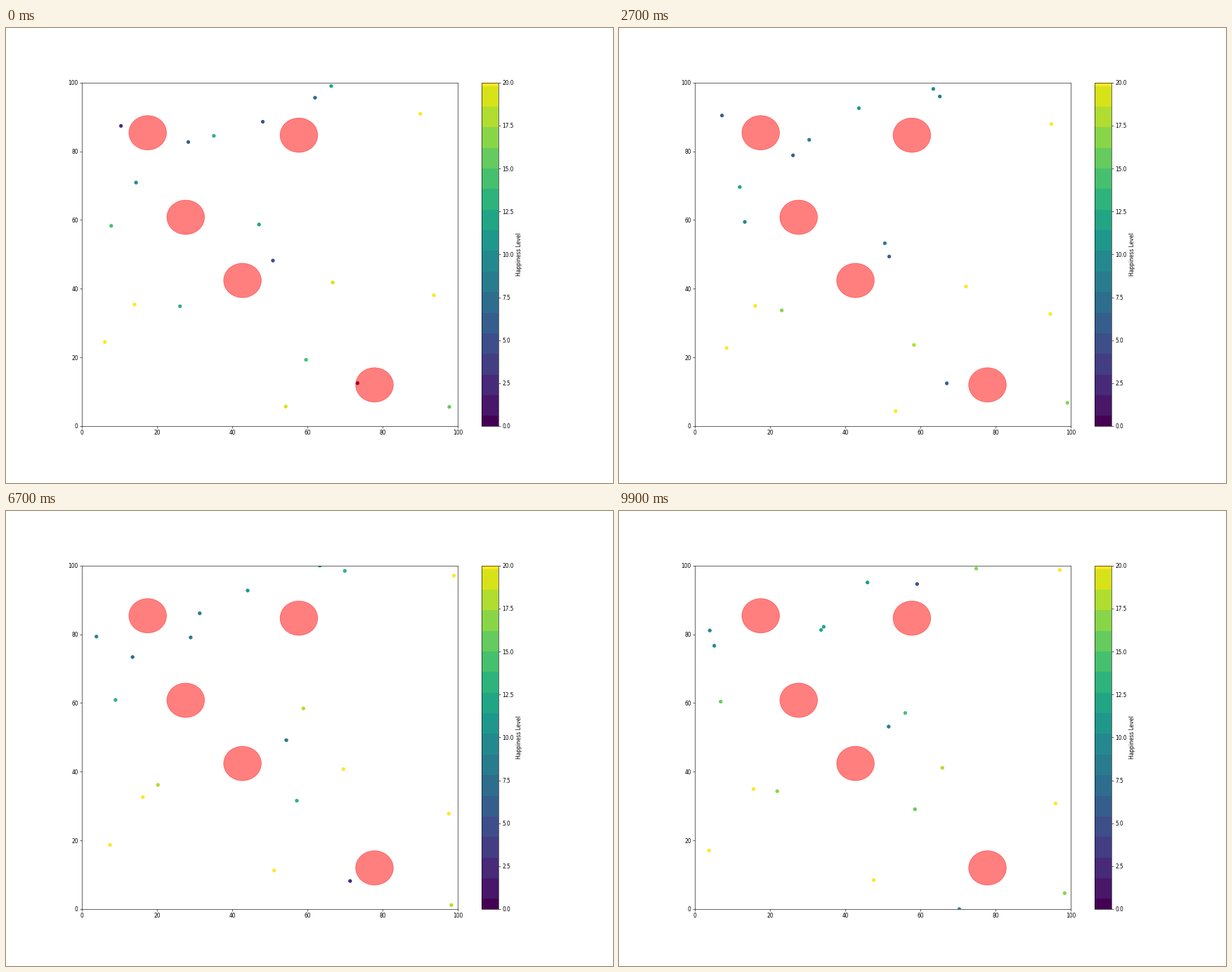
Recreate the animation shown at these times as a matplotlib script. Size 864 by 648 pixels, loop 10000 ms.

```python
import numpy as np
import matplotlib.pyplot as plt
from matplotlib.animation import FuncAnimation
from matplotlib.colors import BoundaryNorm, ListedColormap

FRAMES, INTERVAL = 100, 100
SIZE, RADIUS, MAX_LEVEL, BAND = 100, 5, 20, 1.2

CIRCLES = np.array([(17.5, 85.4), (57.7, 84.7), (27.6, 60.8),
                    (42.7, 42.4), (77.8, 12.0)])
START = np.array([
    (10.4, 87.4), (28.3, 82.7), (35.1, 84.5), (48.1, 88.6), (62.0, 95.6),
    (66.3, 99.0), (90.0, 90.9), (14.4, 70.9), (7.8, 58.3), (47.1, 58.7),
    (50.8, 48.2), (66.7, 41.8), (93.6, 38.1), (14.0, 35.4), (26.1, 34.9),
    (6.1, 24.5), (59.6, 19.3), (73.3, 12.5), (54.2, 5.7), (97.7, 5.6)])


def gap(points):
    """Distance from each point to the rim of the nearest circle."""
    return np.linalg.norm(points[:, None] - CIRCLES, axis=2).min(axis=1) - RADIUS


def happiness(points):
    return gap(points).clip(0, MAX_LEVEL)


def random_walk(seed=7):
    """Small uniform steps, stopped by the walls and the circles."""
    rng = np.random.default_rng(seed)
    path = [START]
    for _ in range(FRAMES - 1):
        old = path[-1]
        new = (old + rng.uniform(-1, 1, old.shape)).clip(0, SIZE)
        free = gap(new) >= np.minimum(gap(old), 0)
        path.append(np.where(free[:, None], new, old))
    return path


def banded_viridis():
    """Viridis in flat bands centred on multiples of BAND."""
    inner = np.arange(BAND / 2, MAX_LEVEL, BAND)
    levels = np.linspace(0, 1, len(inner) + 1)
    cmap = ListedColormap(plt.get_cmap("viridis")(levels))
    edges = [0, *inner, MAX_LEVEL]
    return cmap, BoundaryNorm(edges, cmap.N, clip=True)


path = random_walk()
cmap, norm = banded_viridis()

plt.rcParams["font.family"] = "DejaVu Sans"
fig, ax = plt.subplots(figsize=(16, 12), dpi=54, facecolor="white")
fig.subplots_adjust(left=0.125, right=0.8995, bottom=0.125, top=0.88)
ax.set(xlim=(0, SIZE), ylim=(0, SIZE))

dots = ax.scatter(*START.T, c=happiness(START), cmap=cmap, norm=norm)
for center in CIRCLES:
    ax.add_patch(plt.Circle(center, RADIUS, color="r", alpha=0.5, zorder=2))

bar = fig.colorbar(dots, ax=ax, spacing="proportional", format="%.1f",
                   ticks=np.arange(0, MAX_LEVEL + 1, 2.5))
bar.minorticks_off()
bar.set_label("Happiness Level")


def update(frame):
    dots.set_offsets(path[frame])
    dots.set_array(happiness(path[frame]))
    return dots,


anim = FuncAnimation(fig, update, frames=FRAMES, interval=INTERVAL,
                     repeat=True, repeat_delay=0)
plt.show()
```
